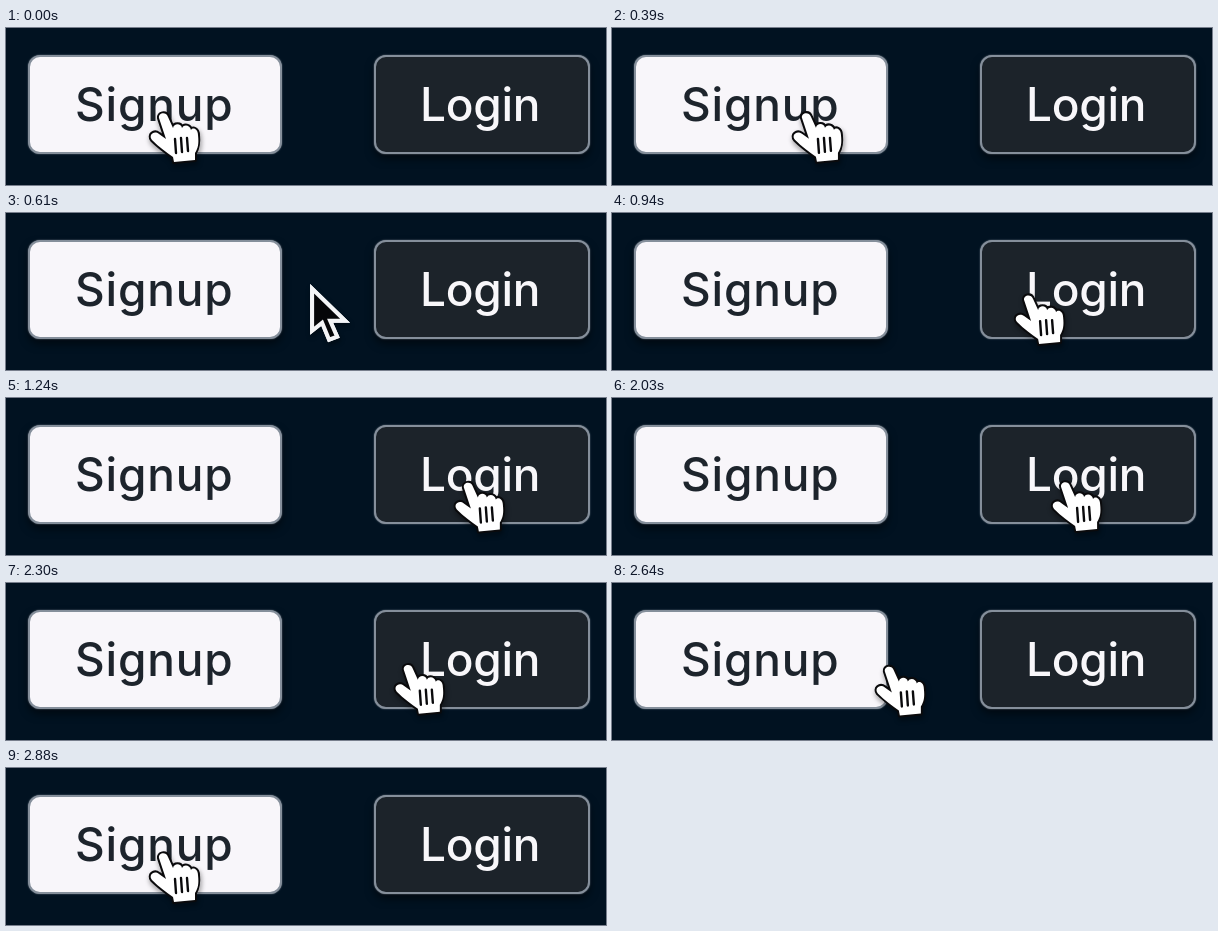
An HTML page with a canvas for the animation above (3180 ms loop, 600 by 157 pixels).

```html
<!DOCTYPE html>
<html lang="en">
<head>
<meta charset="utf-8">
<title>Signup and login</title>
<style>
  html, body { margin: 0; width: 100%; height: 100%; overflow: hidden; background: #011221; }
  #stage { position: relative; width: 600px; height: 157px; overflow: hidden; }
  .btn {
    position: absolute; top: 27px; height: 99px; box-sizing: border-box;
    border: 2px solid #858f9b; border-radius: 12px;
    box-shadow: 0 0 1.5px #858f9b, 0 5px 9px rgba(0, 0, 0, .5);
  }
  .btn.over { box-shadow: 0 0 1.5px #858f9b; }
  .btn span {
    position: absolute; top: 17px; white-space: nowrap;
    font: 500 46px/60px Inter, Roboto, sans-serif; font-optical-sizing: none;
  }
  #signup { left: 22px; width: 254px; background: #f8f6fa; color: #1d242c; }
  #signup span { left: 45px; letter-spacing: .8px; }
  #login { left: 368px; width: 216px; background: #1c232a; color: #f8f7fa; }
  #login span { left: 44px; letter-spacing: -.3px; }
  canvas { position: absolute; left: 0; top: 0; }
</style>
</head>
<body>
<div id="stage">
  <div class="btn" id="signup"><span>Signup</span></div>
  <div class="btn" id="login"><span>Login</span></div>
  <canvas id="pointer" width="600" height="157"></canvas>
</div>
<script>
const LOOP = 3180;
const GO = { from: 330, to: 1450 };
const BACK = { from: 1730, to: 2860 };
const LEFT = 156, RIGHT = 468, BASE = 85, RISE = 3.5;

const signup = document.getElementById('signup');
const login = document.getElementById('login');
const ctx = document.getElementById('pointer').getContext('2d');

const handShape = new Path2D(
  'M-3 5 C-4 0 4 -2 6 4 L11 15 C12 10 19 10 20 15 C22 11 28 12 29 17 ' +
  'C31 14 36 16 36 22 C37 31 36 35 33 40 L33 47 L12 49 L11 44 ' +
  'C4 39 -3 34 -10 27 C-14 22 -8 17 -3 21 L4 26 Z');
const handLines = new Path2D('M13 26 L14 40 M19 25 L20 39 M25 25 L26 38');
const arrowShape = new Path2D('M2 4 L2 46 L12 38 L19 55 L27 52 L20 36 L35 36 Z');

const progress = (t, leg) =>
  Math.min(1, Math.max(0, (t - leg.from) / (leg.to - leg.from)));
const easeOut = u => 1 - Math.pow(1 - u, 2.25);

// 0 over Signup, 1 over Login; the way back mirrors the way out
function travel(t) {
  return t < BACK.from ? easeOut(progress(t, GO)) : easeOut(1 - progress(t, BACK));
}

function shadow(on) {
  ctx.shadowColor = on ? 'rgba(0,0,0,.45)' : 'transparent';
  ctx.shadowBlur = 5;
  ctx.shadowOffsetX = 1;
  ctx.shadowOffsetY = 3;
}

function drawHand() {
  shadow(true);
  ctx.strokeStyle = '#0a0a0c';
  ctx.lineWidth = 4;
  ctx.stroke(handShape);
  shadow(false);
  ctx.fillStyle = '#fff';
  ctx.fill(handShape);
  ctx.lineWidth = 2.4;
  ctx.stroke(handLines);
}

function drawArrow() {
  ctx.strokeStyle = '#f4f5f7';
  ctx.lineWidth = 4;
  ctx.lineJoin = 'miter';
  shadow(true);
  ctx.stroke(arrowShape);
  shadow(false);
  ctx.fillStyle = '#050608';
  ctx.fill(arrowShape);
  ctx.stroke(arrowShape);
}

function draw(t) {
  const p = travel(t);
  const x = LEFT + (RIGHT - LEFT) * p;
  const y = BASE - RISE * Math.sin(Math.PI * p * p);
  const onSignup = x < 280, onLogin = x > 370;
  signup.classList.toggle('over', onSignup);
  login.classList.toggle('over', onLogin);

  ctx.clearRect(0, 0, 600, 157);
  ctx.save();
  ctx.lineCap = ctx.lineJoin = 'round';
  if (onSignup || onLogin) {
    ctx.translate(x, y);
    drawHand();
  } else {
    ctx.translate(x - 1, y - 11);
    drawArrow();
  }
  ctx.restore();
}

const start = performance.now();
function tick() {
  draw((performance.now() - start) % LOOP);
  requestAnimationFrame(tick);
}
tick();
</script>
</body>
</html>
```
